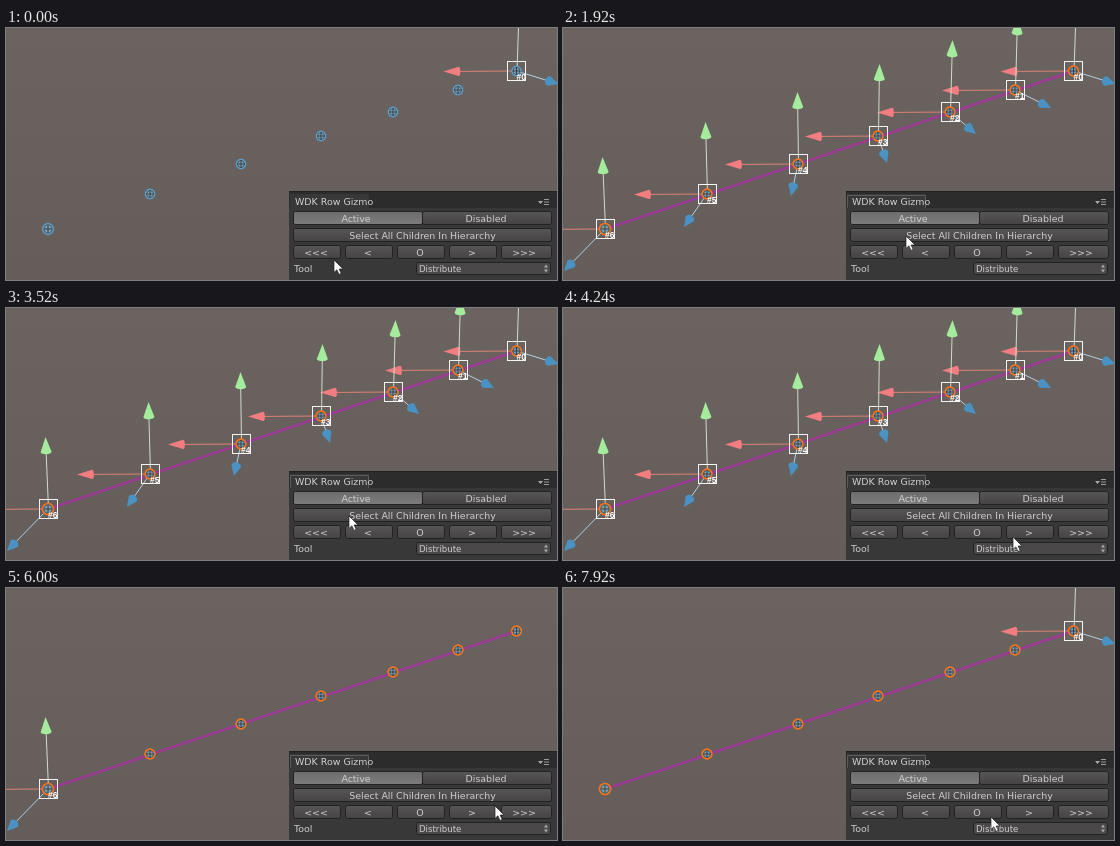
Animation of 551x252 px, one loop 8 s. Source, as an HTML page:

```html
<!DOCTYPE html>
<html lang="en">
<head>
<meta charset="utf-8">
<title>Position tools</title>
<style>
html, body { margin: 0; width: 100%; height: 100%; overflow: hidden; background: #68605d; }
svg { display: block; width: 551px; height: 252px; }
text { font: 9.45px "DejaVu Sans", Verdana, sans-serif; fill: #d0d0d0; }
.tag { font: bold 8.5px "Liberation Sans", Arial, sans-serif; fill: #fff; }
.mid { text-anchor: middle; }
.small { font-size: 8.6px; }
</style>
</head>
<body>
<svg id="stage" viewBox="0 0 551 252">
  <defs>
    <linearGradient id="sky" x2="0" y2="1">
      <stop stop-color="#6b6360"/><stop offset="1" stop-color="#655d5a"/>
    </linearGradient>
    <linearGradient id="btn" x2="0" y2="1">
      <stop stop-color="#575555"/><stop offset="1" stop-color="#454343"/>
    </linearGradient>
    <linearGradient id="on" x2="0" y2="1">
      <stop stop-color="#6c6c6c"/><stop offset="1" stop-color="#7c7c7c"/>
    </linearGradient>
  </defs>
  <rect width="551" height="252" fill="url(#sky)"/>
</svg>
<script>
const NS = "http://www.w3.org/2000/svg";
const stage = document.getElementById("stage");

function add(parent, tag, attrs = {}, text) {
  const el = document.createElementNS(NS, tag);
  for (const k in attrs) el.setAttribute(k, attrs[k]);
  if (text) el.textContent = text;
  parent.append(el);
  return el;
}
const group = () => add(stage, "g");
const path = (g, d, stroke, width = 1, fill = "none") =>
  add(g, "path", { d, stroke, "stroke-width": width, fill });

// x, y, lean of the up axis, offset of the depth axis tip
const points = [
  [510.5, 43, 2.5, 42, 13], [452, 62, 2, 36, 18], [387, 84, 2, 26, 22],
  [315, 108, 1, 9, 27], [235, 136, -1, -7, 32], [144, 166, -2, -23, 33],
  [42, 201, -3, -41, 42]
];

// Axis line ending in a cone whose tip lies at (dx, dy) from the point
function axis(g, x, y, dx, dy, len, half, bulge, line, color) {
  const d = Math.hypot(dx, dy), ux = dx / d, uy = dy / d;
  const tx = x + dx, ty = y + dy, bx = tx - ux * len, by = ty - uy * len;
  const px = -uy * half, py = ux * half;
  const turn = Math.atan2(py, px) * 180 / Math.PI;
  path(g, `M${x} ${y}L${bx} ${by}`, line);
  path(g, `M${bx + px} ${by + py}A${half} ${half * bulge} ${turn} 0 1 ${bx - px} ${by - py}L${tx} ${ty}Z`,
    "none", 0, color);
}

function gizmo([x, y, lean, zx, zy]) {
  const g = group();
  axis(g, x, y, -73, .5, 15, 4.7, .4, "#dc8274", "#f27c80");
  axis(g, x + .5, y, lean, -72, 15, 5.5, .4, "#cfdccb", "#a4ec9c");
  axis(g, x, y, zx, zy, 10, 4.8, .8, "#b4d0e0", "#4b92c4");
  return g;
}

function frame([x, y], i) {
  const g = group();
  add(g, "rect", { x: Math.floor(x) - 8.5, y: y - 9.5, width: 18, height: 19, fill: "none", stroke: "#f4f4f4" });
  add(g, "text", { x: x, y: y + 8.5, class: "tag" }, "#" + i);
  return g;
}

// Small wire ball with a glowing outline
function sphere(g, [x, y], i, ring, width) {
  const r = i === 6 ? 5.4 : 4.7;
  add(g, "circle", { cx: x, cy: y, r: r + 1, fill: ring, opacity: .3 });
  add(g, "circle", { cx: x, cy: y, r, fill: "#7f9cac", stroke: ring, "stroke-width": width });
  add(g, "circle", { cx: x, cy: y, r: r - 1.2, fill: "none", stroke: "#2b3f4c", "stroke-width": .7 });
  path(g, `M${x - 4} ${y}h8M${x} ${y - 4}v8`, "#24323c", .8);
}

const axes = points.map(gizmo);
const idle = group(), picked = group();
for (const dy of [-.5, .9]) path(picked, `M42 ${201 + dy}L510 ${43 + dy}`, "#c41cc0", .75);
points.forEach((p, i) => {
  sphere(idle, p, i, "#55a4d4", 1);
  sphere(picked, p, i, "#ee7420", 1.9);
});
const frames = points.map(frame);

// Tool panel
const panel = group();
const box = (x, y, width, height, fill, stroke = "none", rx = 0) =>
  add(panel, "rect", { x, y, width, height, fill, stroke, rx });
const label = (x, y, s, cls = "") => add(panel, "text", { x, y, class: cls }, s);
function button(x, y, w, h, s, fill = "url(#btn)", tx = x + w / 2) {
  box(x + .5, y + .5, w - 1, h - 1, fill, "#222", 2);
  label(tx, y + 10.5, s, "mid");
}

box(283, 163, 268, 89, "#383838");
box(283, 163, 268, 17, "#2c2c2c");
box(284, 166, 79, 14, "#383838");
const tabEdge = path(panel, "M284.5 180V167.5H362.5V180", "#5c5c5c");
path(panel, "M283 163.5H551", "#222");
label(289, 177, "WDK Row Gizmo");
path(panel, "M532 173h5l-2.5 3z", "none", 0, "#aaa");
path(panel, "M538 171.5h5M538 174h5M538 176.5h5", "#999");
button(287, 183, 130, 14, "Active", "url(#on)", 350);
button(416, 183, 130, 14, "Disabled", "url(#btn)", 480);
button(287, 200, 259, 14, "Select All Children In Hierarchy");
["<<<", "<", "O", ">", ">>>"].forEach((s, i) =>
  button(287 + 52 * i, 217, i < 4 ? 48 : 51, 14, s, "url(#btn)", 310 + 52 * i));
label(288, 243.5, "Tool");
box(410.5, 234.5, 134, 12, "#4a4848", "#222", 2);
label(413, 243.5, "Distribute", "small");
path(panel, "M538 239.5l2-3 2 3zM538 241.5l2 3 2-3z", "none", 0, "#aaa");

const cursor = path(stage, "M0 0V12.4L2.9 9.8L5 14.4L7.2 13.4L5.1 9H9Z", "#222", .7, "#fff");

// time, x, y
const track = [
  [0, 328, 232], [560, 343, 208], [3760, 343, 208], [4240, 450, 229],
  [4720, 516, 223], [5440, 516, 223], [6000, 489, 218], [6480, 395, 219],
  [6960, 318, 223], [7600, 318, 223], [7920, 428, 229]
];
function cursorAt(t) {
  const n = track.findIndex(k => k[0] > t);
  if (n < 0) return track.at(-1).slice(1);
  const [t0, x0, y0] = track[n - 1], [t1, x1, y1] = track[n];
  const k = (t - t0) / (t1 - t0);
  return [x0 + (x1 - x0) * k, y0 + (y1 - y0) * k];
}

const LOOP = 8000, STEP = 80;
const SELECT = 1680, LAST = 5360, FIRST = 7360;
const show = (el, on) => el.style.display = on ? "" : "none";

function draw(now) {
  const t = Math.floor(now % LOOP / STEP) * STEP;
  const all = t >= SELECT && t < LAST;
  const active = t >= LAST && t < FIRST ? 6 : 0;
  points.forEach((p, i) => {
    show(axes[i], all || i === active);
    show(frames[i], all || i === active);
  });
  show(idle, t < SELECT);
  show(picked, t >= SELECT);
  show(tabEdge, t >= SELECT);
  const [x, y] = cursorAt(t);
  cursor.setAttribute("transform", `translate(${Math.round(x)} ${Math.round(y)})`);
}

const start = performance.now();
function tick() {
  draw(performance.now() - start);
  requestAnimationFrame(tick);
}
tick();
</script>
</body>
</html>
```
